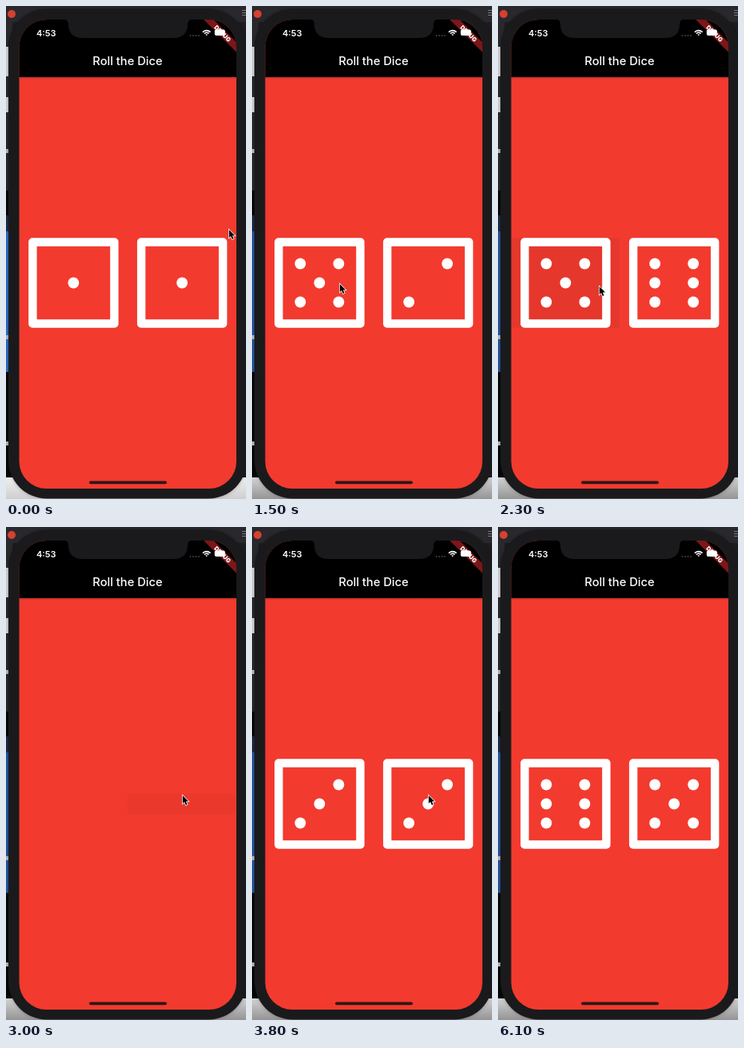
An HTML page with a canvas for the animation above (6200 ms loop, 300x617 px).

```html
<!DOCTYPE html>
<html lang="en">
<head>
<meta charset="utf-8">
<title>Roll the Dice</title>
<style>
  html, body { margin: 0; width: 100%; height: 100%; overflow: hidden; background: #1c1c1e; }
  canvas { display: block; width: 300px; height: 617px; }
</style>
</head>
<body>
<canvas id="stage"></canvas>
<script>
const W = 300, H = 617, LOOP = 6200, STEP = 100;
const RED = '#f33a2f', BEZEL = '#1a1a1c';
const screen = { x: 16.5, y: 17, w: 271.5, h: 587, r: 34 };
const right = screen.x + screen.w, barEnd = 89;
const cellW = screen.w / 2, rowY = 346.5;

const canvas = document.getElementById('stage');
const ctx = canvas.getContext('2d');
const ratio = window.devicePixelRatio || 1;
canvas.width = W * ratio;
canvas.height = H * ratio;

// The faces change one step after the press; new images may leave a gap first
const taps = [
  { at: 700, cell: 0, faces: [5, 2] },
  { at: 2100, cell: 0, faces: [5, 6] },
  { at: 2900, cell: 1, faces: [3, 3], gap: true },
  { at: 3900, cell: 1, faces: [6, 5] }
];

// Pointer moves: each glides to a point between two times
const moves = [
  { from: 0, to: 100, x: 133, y: 175 },
  { from: 200, to: 400, x: 128, y: 244 },
  { from: 500, to: 800, x: 109, y: 347 },
  { from: 1500, to: 1900, x: 126, y: 350 },
  { from: 2400, to: 2700, x: 220, y: 335 },
  { from: 4700, to: 5000, x: 250, y: 361 },
  { from: 5000, to: 5200, x: 310, y: 320 }
];

function box(x, y, w, h, color) {
  ctx.fillStyle = color;
  ctx.fillRect(x, y, w, h);
}

function round(x, y, w, h, r, color) {
  ctx.beginPath();
  ctx.roundRect(x, y, w, h, r);
  ctx.fillStyle = color;
  ctx.fill();
}

function disc(x, y, r, color) {
  ctx.beginPath();
  ctx.arc(x, y, r, 0, Math.PI * 2);
  ctx.fillStyle = color;
  ctx.fill();
}

function fade(y, h, top, bottom) {
  const g = ctx.createLinearGradient(0, y, 0, y + h);
  g.addColorStop(0, top);
  g.addColorStop(1, bottom);
  box(0, y, W, h, g);
}

function label(text, x, y, font, align = 'center') {
  ctx.font = font + ' Inter, Roboto, sans-serif';
  ctx.textAlign = align;
  ctx.fillStyle = '#fff';
  ctx.fillText(text, x, y);
}

function drawDesktop(focused) {
  const row = (y, h, color) => box(0, y, 8, h, color);
  box(0, 0, W, H, '#1d1c20');
  box(0, 0, W, 20, '#29282d');
  row(20, 211, '#29292c');
  row(51, 37, '#d5d5d7');
  row(114, 19, '#d5d5d7');
  row(231, 359, '#060608');
  row(262, 20, '#1c2c4a');
  row(282, 176, focused ? '#2b6fd0' : '#2457a5');
  for (const y of [179, 412, 545]) row(y, 5, '#b9b9bc');
  if (focused) fade(590, 27, '#f0f0f0', '#cecece');
  else fade(590, 27, '#d2d2d2', '#949494');
  disc(7, 10, 5, '#d8402f');
  for (let y = 5; y < 13; y += 3) box(295, y, 5, 1, '#77767b');
}

function drawPhone() {
  ctx.save();
  ctx.shadowColor = 'rgba(0,0,0,.3)';
  ctx.shadowBlur = 4 * ratio;
  round(3, 3.5, 298, 613, 48, BEZEL);
  ctx.restore();
}

function drawNotch() {
  const mid = 152.5, y = screen.y;
  ctx.beginPath();
  for (const s of [-1, 1]) {
    ctx.moveTo(mid, y - 1);
    ctx.lineTo(mid + s * 81, y - 1);
    ctx.quadraticCurveTo(mid + s * 74.5, y, mid + s * 74.5, y + 6);
    ctx.bezierCurveTo(mid + s * 74.5, y + 17, mid + s * 68, y + 23, mid + s * 57, y + 23);
    ctx.lineTo(mid, y + 23);
  }
  ctx.fillStyle = BEZEL;
  ctx.fill();
  box(mid - 1, y, 2, 23, BEZEL);
}

function drawBanner() {
  ctx.save();
  ctx.translate(right, screen.y);
  ctx.rotate(Math.PI / 4);
  box(-29, 20.2, 58, 8.7, '#7c1718');
  label('DEBUG', 0, 27.2, '900 7.4px');
  ctx.restore();
}

function drawStatus() {
  label('4:53', 38, 37.5, '600 11px', 'left');
  for (let i = 0; i < 4; i++) disc(230.5 + i * 3.5, 37, 0.9, '#4a4a4a');
  ctx.strokeStyle = '#fff';
  ctx.lineWidth = 1.6;
  for (const r of [1.2, 3.9, 6.6]) {
    ctx.beginPath();
    ctx.arc(250.7, 37.2, r, -Math.PI * 0.76, -Math.PI * 0.24);
    ctx.stroke();
  }
  round(260.8, 29.5, 13, 7.5, 2, '#fff');
}

function drawInk(t, tap, collapsed) {
  const age = t - tap.at;
  if (age < 0 || age >= 500) return;
  const alpha = 0.056 * Math.min(1, age / 150, (500 - age) / 200);
  const h = collapsed ? 26 : 112;
  box(screen.x + tap.cell * cellW, rowY - h / 2, cellW, h, `rgba(0,0,0,${alpha})`);
}

function drawDie(cell, face) {
  const x = screen.x + cellW * (cell + 0.5);
  const pip = (dx, dy) => disc(x + dx * 24, rowY + dy * 24, 6.9, '#fff');
  const pair = (dx, dy) => { pip(dx, dy); pip(-dx, -dy); };
  ctx.beginPath();
  ctx.roundRect(x - 56.2, rowY - 56.2, 112.4, 112.4, 5);
  ctx.rect(x - 45.8, rowY - 45.8, 91.6, 91.6);
  ctx.fillStyle = '#fff';
  ctx.fill('evenodd');
  if (face % 2) pip(0, 0);
  if (face > 1) pair(1, -1);
  if (face > 3) pair(1, 1);
  if (face === 6) pair(1, 0);
}

function drawPointer(t) {
  let x = 278, y = 279;
  if (t >= moves[moves.length - 1].to) return;
  for (const m of moves) {
    const k = Math.min(1, Math.max(0, (t - m.from) / (m.to - m.from)));
    x += (m.x - x) * k;
    y += (m.y - y) * k;
  }
  const arrow = new Path2D('M0 0V11.6L2.6 9.2L4.6 13.8L6.6 12.9L4.7 8.5L8.3 8.4Z');
  ctx.save();
  ctx.translate(x + 0.8, y + 1);
  ctx.scale(0.87, 0.87);
  ctx.lineWidth = 1.7;
  ctx.strokeStyle = '#fff';
  ctx.stroke(arrow);
  ctx.fillStyle = '#000';
  ctx.fill(arrow);
  ctx.restore();
}

function drawScreen(t) {
  ctx.save();
  ctx.beginPath();
  ctx.roundRect(screen.x, screen.y, screen.w, screen.h, screen.r);
  ctx.clip();
  box(0, 0, W, H, RED);

  const gap = taps.some(tap => tap.gap && t === tap.at + STEP);
  taps.forEach(tap => drawInk(t, tap, gap));
  if (!gap) {
    const last = taps.filter(tap => t >= tap.at + STEP).pop();
    (last ? last.faces : [1, 1]).forEach((face, cell) => drawDie(cell, face));
  }

  fade(barEnd, 3, 'rgba(0,0,0,.18)', 'rgba(0,0,0,0)');
  box(0, 0, W, barEnd, '#000');
  label('Roll the Dice', 152, 74, '500 14.7px');
  round(104, 594.4, 97, 3.8, 1.9, '#2e1715');
  drawBanner();
  ctx.restore();
  drawNotch();
  drawStatus();
}

let start;
function frame(now) {
  start ??= now;
  const t = Math.floor(((now - start) % LOOP) / STEP) * STEP;
  ctx.setTransform(ratio, 0, 0, ratio, 0, 0);
  drawDesktop(t < taps[0].at);
  drawPhone();
  drawScreen(t);
  drawPointer(t);
  requestAnimationFrame(frame);
}
requestAnimationFrame(frame);
</script>
</body>
</html>
```
